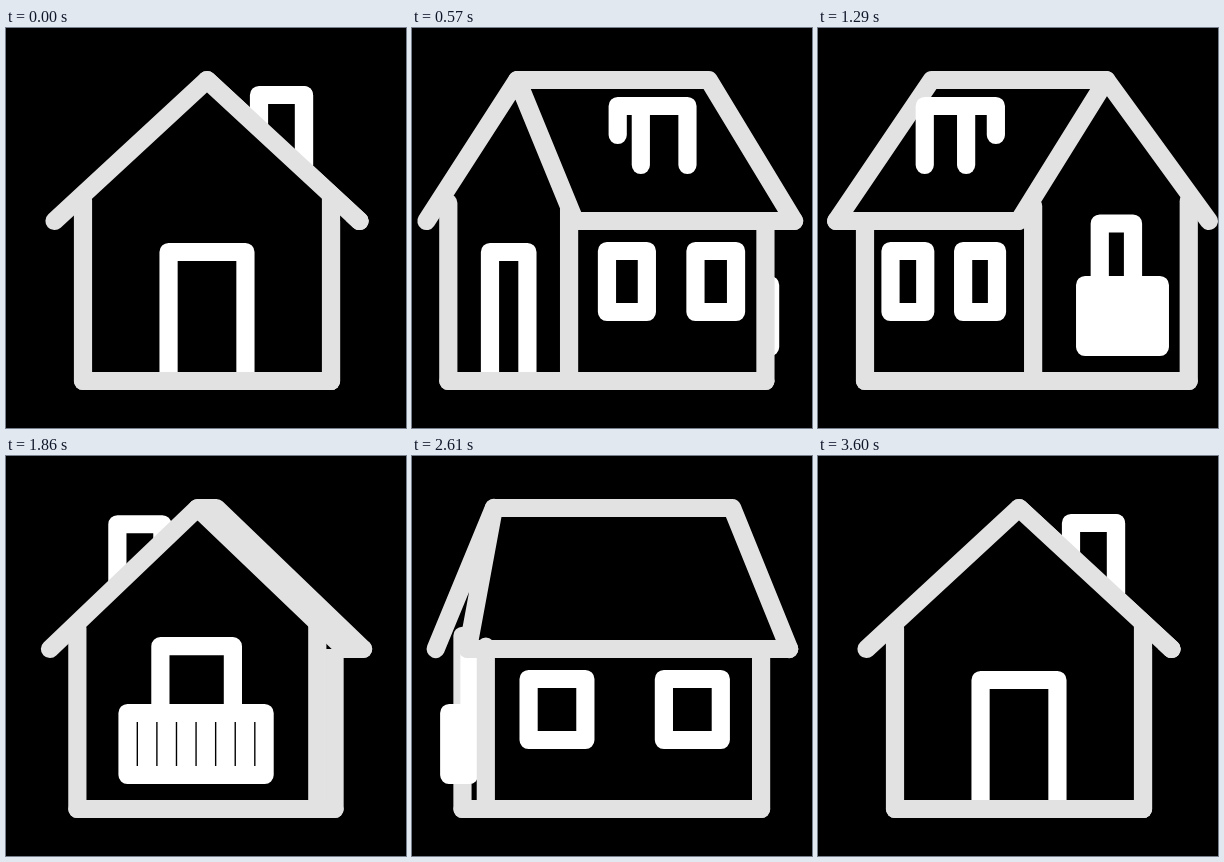
Animation of 400x400 px, one loop 3630 ms. Source, as an HTML page with a canvas:

```html
<!DOCTYPE html>
<html lang="en">
<head>
<meta charset="utf-8">
<title>Turning house</title>
<style>
html, body { margin: 0; width: 100%; height: 100%; overflow: hidden; background: #000; }
canvas { display: block; width: 400px; height: 400px; }
</style>
</head>
<body>
<canvas id="stage" width="400" height="400"></canvas>
<script>
const ctx = document.getElementById('stage').getContext('2d');
const GRAY = '#e2e2e2', WHITE = '#fff', BLACK = '#000';
const LOOP = 3630, STEP = 30, TURN = 120, SIDE = 29;
const RIDGE = 52, EAVE = 193, FLOOR = 353;

// Steps within a half turn and the view reached there: 0 gable, 1 corner, 2 side.
const VIEWS = [[0, 0], [0.4, 0], [14.3, 1], [SIDE, 2], [45, 1], [60, 0]];

function trace(points, closed) {
  ctx.beginPath();
  points.forEach(([x, y]) => ctx.lineTo(x, y));
  if (closed) ctx.closePath();
}

function line(color, points, closed) {
  trace(points, closed);
  ctx.strokeStyle = color;
  ctx.stroke();
}

function fill(points) {
  trace(points, true);
  ctx.fillStyle = BLACK;
  ctx.fill();
}

const rect = (l, t, r, b) => [[l, t], [r, t], [r, b], [l, b]];

function viewAt(q) {
  const i = VIEWS.findIndex(([end], n) => n > 0 && q <= end);
  const [a, va] = VIEWS[i - 1], [b, vb] = VIEWS[i];
  return va + (vb - va) * (q - a) / (b - a);
}

function balcony(mid, half) {
  const l = mid - half, r = mid + half, top = 257, low = 319;
  const box = rect(l, top, r, low);
  fill(box);
  line(WHITE, box, true);
  for (let i = 1; i < 7; i++) {
    const x = l + (r - l) * i / 7;
    line(WHITE, [[x, top], [x, low]]);
  }
}

function draw(step) {
  const q = step % 60, late = q > SIDE;
  const chimneySide = step < 60;
  const frontNear = chimneySide !== late;
  const v = viewAt(q);
  const mix = (gable, corner, side) => v < 1
    ? gable + (corner - gable) * v
    : corner + (side - corner) * (v - 1);

  ctx.setTransform(1, 0, 0, 1, 0, 0);
  ctx.fillStyle = BLACK;
  ctx.fillRect(0, 0, 400, 400);
  ctx.setTransform(late ? -1 : 1, 0, 0, 1, 201, 0);
  ctx.lineWidth = 18.2;
  ctx.lineCap = ctx.lineJoin = 'round';

  const apex = [mix(0, -82, -125), RIDGE];
  const farApex = [mix(0, 82, 125), RIDGE];
  const eaveL = [mix(-152.5, -192, -175), EAVE];
  const eaveR = [mix(152.5, 25, -172), EAVE];
  const farEave = [mix(152.5, 184, 175), EAVE];
  const wallL = mix(-124, -173, -147);
  const wallR = mix(124, 5, -148);
  const farWall = mix(124, 155, 147);
  const topL = mix(172, 172, 181), topR = mix(168, 176, EAVE);
  const chimneyTop = mix(67, 78, 78);

  // Parts on the far side
  if (frontNear) balcony(mix(0, 110, 163), mix(72, 42, 5));
  if (!chimneySide) {
    const a = mix(-97, -33, -30), b = mix(-52, 12, 30);
    line(WHITE, [[a, 137], [a, chimneyTop], [b, chimneyTop], [b, 107]]);
  }

  // Roof and long wall
  fill([apex, farApex, farEave, eaveR]);
  fill(rect(wallR, EAVE, farWall, FLOOR));
  line(GRAY, [apex, farApex, farEave]);

  if (chimneySide) {
    const side = frontNear ? -47 : -18;
    const inner = mix(52, 29, side);
    const near = mix(97, 63, side);
    const far = mix(97, 101, frontNear ? 18 : 47);
    const outline = [[inner, 107], [inner, chimneyTop], [far, chimneyTop], [far, 137]];
    fill([...outline, [near, 137]]);
    line(WHITE, outline);
    line(WHITE, [[near, chimneyTop], [near, 137]]);
  }

  for (const [c0, s0, c1, s1] of [[40, -104, 70, -43], [101, 43, 132, 104]]) {
    line(WHITE, rect(mix(122, c0, s0), 223, mix(122, c1, s1), 284), true);
  }
  line(GRAY, [[farWall, EAVE], [farWall, FLOOR]]);

  // Gable
  fill([apex, eaveR, [wallR, EAVE], [wallR, FLOOR], [wallL, FLOOR], [wallL, topL], eaveL]);
  line(GRAY, [[wallL, topL], [wallL, FLOOR]]);
  if (frontNear) {
    const mid = (wallL + wallR) / 2, half = (wallR - wallL) * 0.155;
    line(WHITE, [[mid - half, FLOOR], [mid - half, 224], [mid + half, 224], [mid + half, FLOOR]]);
  } else {
    const mid = mix(0, -90, -149), half = mix(38.5, 19, 0), top = mix(189.5, 195.5, 195.5);
    line(WHITE, [[mid - half, 290], [mid - half, top], [mid + half, top], [mid + half, 290]]);
    balcony(mix(0, -95, -163), mix(72, 42, 5));
  }

  line(GRAY, [[wallR, topR], [wallR, FLOOR]]);
  line(GRAY, [[wallL, FLOOR], [wallR, FLOOR], [farWall, FLOOR]]);
  line(GRAY, [eaveR, farEave]);
  line(GRAY, [eaveL, apex, eaveR]);
}

const start = performance.now();
function tick(now) {
  const t = Math.max(0, now - start) % LOOP;
  draw(Math.floor(t / STEP) % TURN);
  requestAnimationFrame(tick);
}
draw(0);
requestAnimationFrame(tick);
</script>
</body>
</html>
```
